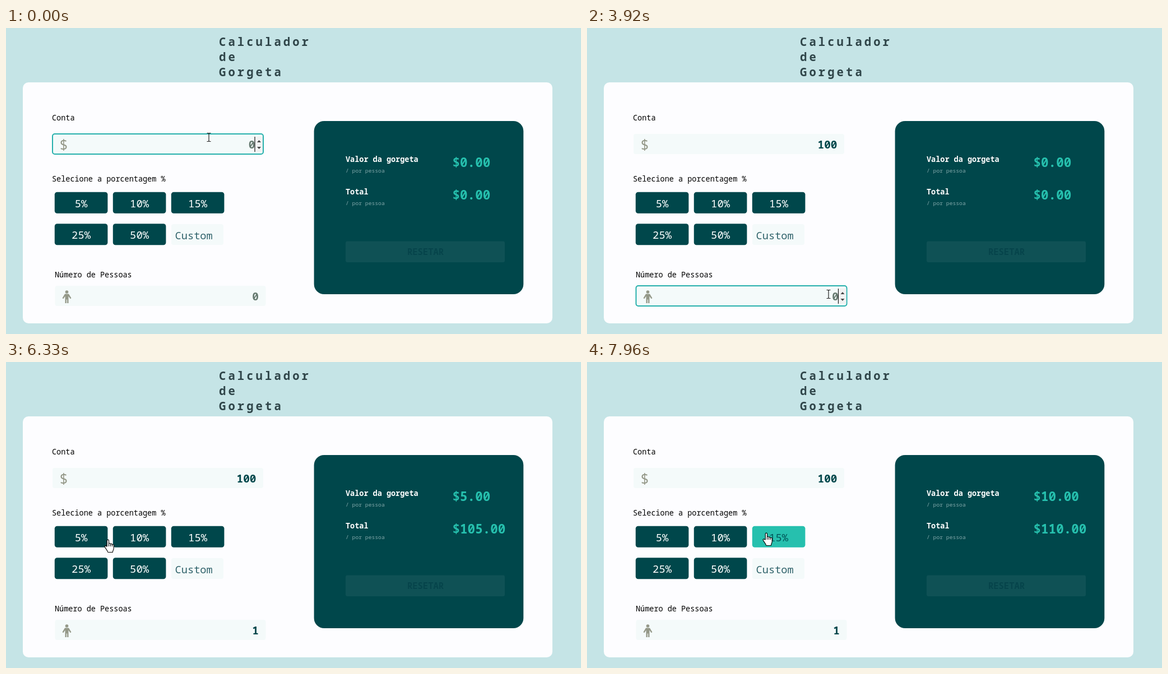
Write an HTML page that moves like this. It is 1026 by 546 pixels and loops after 8000 ms.

```html
<!DOCTYPE html>
<html lang="pt">
<head>
<meta charset="utf-8">
<style>
html, body { margin: 0; width: 100%; height: 100%; overflow: hidden; background: #c5e4e6; }
svg { display: block; width: 1026px; height: 546px; cursor: default; }
text { font: 500 13.5px "Noto Sans Mono", "DejaVu Sans Mono", monospace; white-space: pre; }
.title { font-size: 20.5px; font-weight: 600; letter-spacing: 4.1px; fill: #2f4549; }
.button rect { fill: #00474b; }
.button text { font-size: 18.9px; fill: #fff; text-anchor: middle; }
.button.hover rect { fill: #26c0ae; }
.button.hover text { fill: #00575a; }
.custom { font-size: 18.7px; fill: #2f626a; }
.head { fill: #fff; font-weight: 700; }
.sub { font-size: 9.7px; font-weight: 400; fill: #82a8aa; }
.amount { font-size: 22.6px; font-weight: 700; fill: #26c0ae; }
.reset { font-size: 15.5px; font-weight: 700; fill: #06444b; text-anchor: middle; }
.value { font-size: 19.4px; font-weight: 600; text-anchor: end; fill: #00474b; }
.value.empty { fill: #667a70; }
.box { fill: #f4fafa; }
.focus .box { stroke: #26b0ac; stroke-width: 2; }
.icon { fill: #949888; }
.dollar { font-size: 25px; }
.pointer { fill: #fff; stroke: #000; stroke-width: 1.1; stroke-linejoin: round; }
</style>
</head>
<body>
<svg viewBox="0 0 1026 546">
  <text class="title" x="380" y="32">Calculador</text>
  <text class="title" x="380" y="59">de</text>
  <text class="title" x="380" y="86">Gorgeta</text>
  <rect x="30" y="97" width="945" height="430" rx="10" fill="#fdfdff"/>

  <text x="82" y="164.5">Conta</text>
  <text x="82" y="274">Selecione a porcentagem %</text>
  <text x="87" y="445">Número de Pessoas</text>
  <g id="buttons"></g>
  <rect class="box" x="295" y="350" width="93" height="37" rx="4"/>
  <text class="custom" x="301.5" y="376.5">Custom</text>
  <g id="fields"></g>
  <text class="icon dollar" x="95.5" y="217">$</text>
  <g class="icon">
    <circle cx="108.5" cy="471" r="2.8"/>
    <path d="M105 474.5h7l4.5 7.5-1.8 1.2-3.2-4.7V491h-2.4v-6.5h-1.2V491h-2.4v-12.5l-3.2 4.7-1.8-1.2z"/>
  </g>

  <rect x="549.6" y="166" width="373.7" height="309" rx="18" fill="#00474b"/>
  <text class="head" x="606" y="238.5">Valor da gorgeta</text>
  <text class="sub" x="606" y="258">/ por pessoa</text>
  <text class="head" x="606" y="296.5">Total</text>
  <text class="sub" x="606" y="316">/ por pessoa</text>
  <text class="amount" id="tip" x="796.5" y="248"></text>
  <text class="amount" id="total" x="796.5" y="305.5"></text>
  <rect x="606" y="380.5" width="284" height="37.5" rx="3" fill="#0f5155"/>
  <text class="reset" x="748.5" y="405">RESETAR</text>

  <g id="cursor">
    <path id="arrow" class="pointer" d="M.5.5V16l3.6-3.4 2.5 5.7 2.3-1-2.5-5.5h4.9z"/>
    <path id="hand" class="pointer" d="M-1.7 12V1.7C-1.7-.4 1.5-.4 1.5 1.7V7.5C1.8 6 4.5 6.3 4.5 8 5 6.8 7.4 7.2 7.4 9 8 8 10.2 8.4 10.2 10V15.5C10.2 18 8.5 19 8.3 22.5H-.2C-.8 19.5-4 16.5-5.8 12.8-6.5 11-4.3 10.3-3.3 11.6zM1.5 7.5V12M4.5 8.5V12M7.4 9.5V12"/>
    <path id="beam" fill="none" stroke="#222" stroke-width="1.2" d="M-3.5-7.5H-1L0-6.5 1-7.5H3.5M0-6.5V6.5M-3.5 7.5H-1L0 6.5 1 7.5H3.5"/>
  </g>
</svg>
<script>
const LOOP = 8000;
const $ = id => document.getElementById(id);
const show = (el, on) => el.setAttribute("visibility", on ? "visible" : "hidden");
const inside = ([px, py], { x, y, w, h }) => px >= x && px <= x + w && py >= y && py <= y + h;
// Last entry whose time has been reached.
const at = (steps, t) => steps.filter(s => s[0] <= t).pop();

const path = [ // time, x, y
  [0, 362, 195], [2640, 362, 195], [3050, 399, 315], [3180, 399, 315],
  [3560, 431, 475], [5100, 431, 475], [5500, 141, 312], [6100, 141, 312],
  [6330, 182, 317], [6600, 240, 314], [7050, 240, 314], [7330, 293, 311],
  [7650, 320, 305], [LOOP, 320, 305]
];
const results = [[0, 0, 0], [5660, 5, 105], [6950, 10, 110]]; // time, tip, total

const buttons = ["5%", "10%", "15%", "25%", "50%"].map((label, i) => ({
  label, x: 86.8 + i % 3 * 104, y: i < 3 ? 292.8 : 349.3, w: 94.6, h: 37.9
}));
$("buttons").innerHTML = buttons.map(({ label, x, y, w, h }) =>
  `<g class="button"><rect x="${x}" y="${y}" width="${w}" height="${h}" rx="4.5"/>
   <text x="${x + w / 2}" y="${y + 26.9}">${label}</text></g>`).join("");
buttons.forEach((b, i) => b.el = $("buttons").children[i]);
const buttonRow = { x: 87, y: 293, w: 302, h: 37.5 };

const fields = [
  { x: 83, y: 189, w: 376, h: 36, right: 446.5, focus: [0, 3700],
    keys: [[0, ""], [1100, "1"], [1300, "10"], [1500, "100"]] },
  { x: 87.5, y: 460, w: 376, h: 36, right: 451, focus: [3700, 5540],
    keys: [[0, ""], [3700, ""], [4400, "1"]] }
];
$("fields").innerHTML = fields.map(({ x, y, w, h, right }) =>
  `<g><rect class="box" x="${x}" y="${y}" width="${w}" height="${h}" rx="4"/>
   <text class="value" y="${y + 26}"></text>
   <path stroke="#111" stroke-width="1.2" d="M${right - 2.5} ${y + 5}v27"/>
   <g><rect x="${right - 1.5}" y="${y + 5}" width="13" height="27" fill="#f1f2f2"/>
   <path fill="#444" d="M${right + 1.5} ${y + 15}l3.5-4 3.5 4zm0 8l3.5 4 3.5-4z"/></g></g>`).join("");
fields.forEach((f, i) => {
  f.el = $("fields").children[i];
  [, f.text, f.caret, f.spinner] = f.el.children;
});

function pointerAt(t) {
  const i = path.findIndex(p => p[0] > t);
  const [a, b] = [path[i - 1], path[i]];
  const u = (t - a[0]) / (b[0] - a[0]);
  const k = u * u * (3 - 2 * u);
  return [a[1] + (b[1] - a[1]) * k, a[2] + (b[2] - a[2]) * k];
}

function draw(t) {
  const p = pointerAt(t);
  for (const b of buttons) b.el.classList.toggle("hover", inside(p, b));

  for (const f of fields) {
    const focused = t >= f.focus[0] && t < f.focus[1];
    const active = focused || inside(p, f);
    const [keyTime, value] = at(f.keys, t);
    f.el.classList.toggle("focus", focused);
    f.text.classList.toggle("empty", !value);
    f.text.textContent = value || "0";
    f.text.setAttribute("x", f.right - (active ? 2 : 0));
    show(f.caret, focused && (t - keyTime) % 1060 < 530);
    show(f.spinner, active);
  }

  const [, tip, total] = at(results, t);
  $("tip").textContent = "$" + tip.toFixed(2);
  $("total").textContent = "$" + total.toFixed(2);

  const overField = fields.some(f => inside(p, f));
  const overButton = [buttonRow, ...buttons].some(b => inside(p, b));
  show($("beam"), overField);
  show($("hand"), overButton);
  show($("arrow"), !overField && !overButton);
  $("cursor").setAttribute("transform", `translate(${p})`);
}

const start = performance.now();
function tick() {
  draw((performance.now() - start) % LOOP);
  requestAnimationFrame(tick);
}
tick();
</script>
</body>
</html>
```
